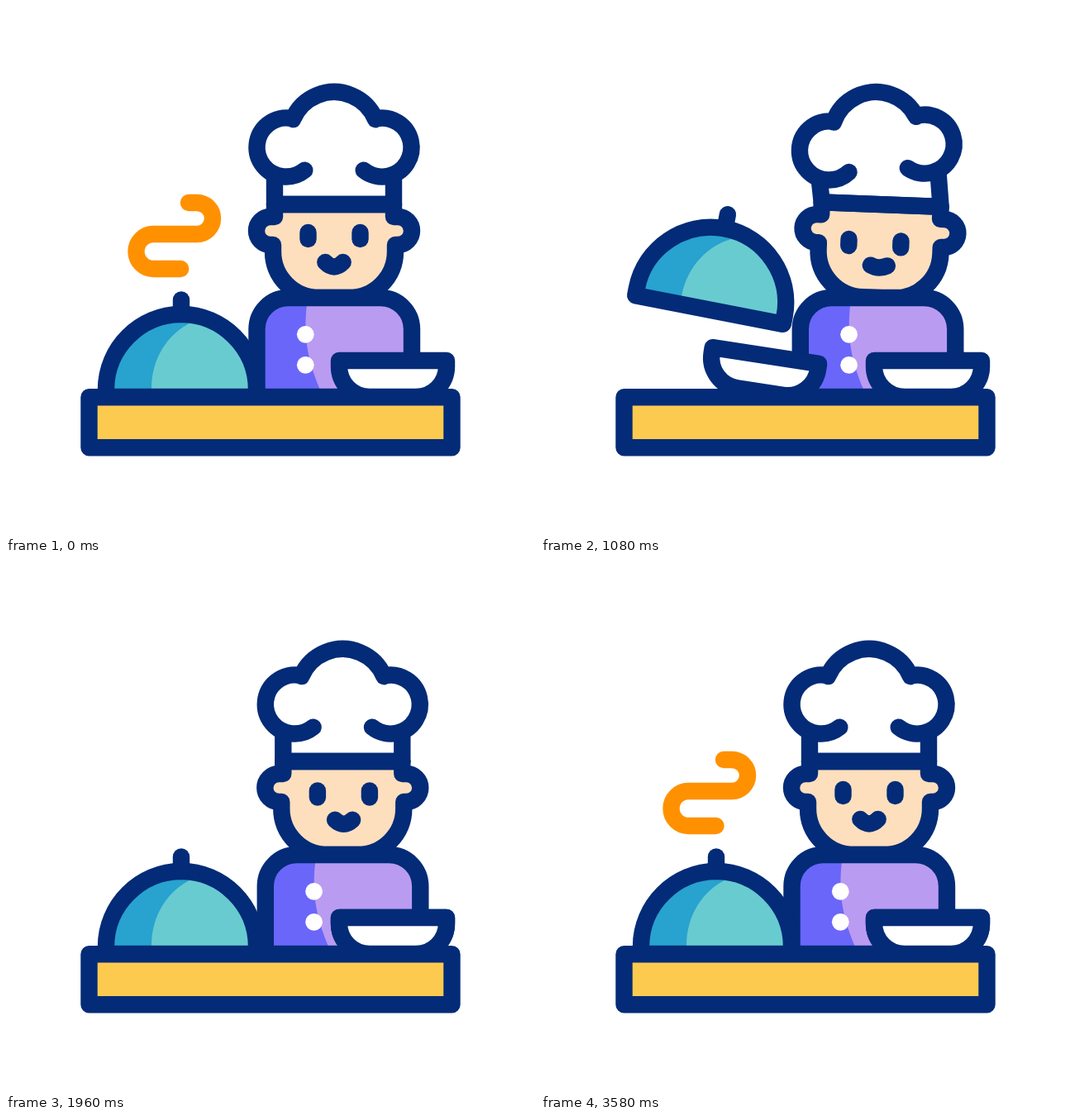
These frames come from a looping animation (640x640 px, 3600 ms). An HTML page with a canvas:

```html
<!DOCTYPE html>
<html lang="en">
<head>
<meta charset="utf-8">
<title>Chef</title>
<style>
  html, body { margin: 0; width: 100%; height: 100%; overflow: hidden; background: #fff; }
  canvas { display: block; width: 640px; height: 640px; }
</style>
</head>
<body>
<canvas id="stage" width="640" height="640"></canvas>
<script>
const ctx = document.getElementById('stage').getContext('2d');
const LOOP = 3600;
const NAVY = '#032b77', YELLOW = '#fdca50', ORANGE = '#ff9100', SKIN = '#fddfbd';
const VIOLET = '#6a66fa', LILAC = '#ba9bf2', BLUE = '#28a2ce', TEAL = '#68cbd0';

const rad = deg => deg * Math.PI / 180;
const ramp = (t, a, b) => Math.min(1, Math.max(0, (t - a) / (b - a)));

// Eased 0 to 1.
function rise(t, a, b) {
  const u = ramp(t, a, b);
  return u * u * (3 - 2 * u);
}

// Eased 0 to 1 and back to 0.
const bump = (t, a, peak, b) => rise(t, a, peak) - rise(t, peak, b);

function motion(t) {
  const aside = rise(t, 300, 1100) - rise(t, 1960, 2640);
  const sway = bump(t, 1080, 1520, 1960);
  const look = rise(t, 150, 480) - rise(t, 1600, 2100);
  const glance = bump(t, 1080, 1520, 2100);
  const lift = bump(t, 500, 1080, 1750);
  const settle = bump(t, 1380, 1520, 1660);
  const body = 10.3 * aside + 19.3 * sway;
  return {
    body,
    head: 5.4 * bump(t, 740, 1520, 1960),
    puff: body - bump(t, 640, 1080, 1520) + 13.8 * sway,
    puffTilt: 1.3 * sway - 3.9 * bump(t, 640, 1080, 1520),
    eyeX: 15.4 * glance - 6 * look,
    eyeY: 9.4 * look - 2 * glance,
    mouthX: 9 * glance,
    mouth: look,
    stretch: 19 * bump(t, 300, 540, 760),
    lidX: -8.5 * lift,
    lidY: -105.5 * lift,
    lidTilt: 11 * lift,
    bowlX: 256 * (rise(t, 880, 1520) - 1) + 3.5 * settle,
    bowlY: 6 * (rise(t, 1520, 1660) - rise(t, 880, 1080)),
    bowlTilt: 8.7 * bump(t, 880, 1080, 1400) - 2 * settle
  };
}

const HEAD = new Path2D(`M325 240 V255 H320 a17 17 0 0 0 0 34 H323 V297
  a56 56 0 0 0 56 56 H415 a56 56 0 0 0 56 -56 V289 H474 a17 17 0 0 0 0 -34 H469 V240 Z`);
const COAT = new Path2D('M303.5 473 V391 a38 38 0 0 1 38 -38 H453 a38 38 0 0 1 38 38 V473 Z');
const COAT_SHADE = new Path2D('M303 353 H365 C359 395 363 428 384 473 H303 Z');
const BOWL = new Path2D('M403 429 H533 V436 a37 37 0 0 1 -37 37 H440 a37 37 0 0 1 -37 -37 Z');
const COUNTER = new Path2D('M100.5 473.3 H539.5 V534.3 H100.5 Z');
const STEAM = new Path2D('M211.5 318 H178.5 a21 21 0 0 1 0 -42 H231 a19 19 0 0 0 0 -38 H221');
const STEAM_LENGTH = 95.5 + 40 * Math.PI;

const PUFF = new Path2D();
PUFF.arc(339, 171, 35.5, rad(51), rad(283));
PUFF.arc(397, 158.4, 54.4, rad(203), rad(337));
PUFF.arc(455, 171, 35.5, rad(257), rad(129));

function paint(path, fill) {
  if (fill) {
    ctx.fillStyle = fill;
    ctx.fill(path);
  }
  ctx.stroke(path);
}

// Fill a shape in two colours, then outline it.
function paintSplit(path, base, part, color) {
  ctx.fillStyle = base;
  ctx.fill(path);
  ctx.save();
  ctx.clip(path);
  ctx.fillStyle = color;
  ctx.fill(part);
  ctx.restore();
  ctx.stroke(path);
}

function line(...points) {
  ctx.beginPath();
  points.forEach(([x, y]) => ctx.lineTo(x, y));
  ctx.stroke();
}

// Shift by (dx, dy) and turn about (px, py).
function pose(dx, dy, deg, px, py, draw) {
  ctx.save();
  ctx.translate(px + dx, py + dy);
  ctx.rotate(rad(deg));
  ctx.translate(-px, -py);
  draw();
  ctx.restore();
}

function place([x, y], dx, deg, px, py) {
  const c = Math.cos(rad(deg)), s = Math.sin(rad(deg));
  return [px + dx + (x - px) * c - (y - py) * s, py + (x - px) * s + (y - py) * c];
}

function drawFace(m) {
  paint(HEAD, SKIN);
  line([325, 240], [469, 240]);
  for (const x of [365.5, 428.5]) {
    line([x + m.eyeX, 274 + m.eyeY], [x + m.eyeX, 282 + m.eyeY]);
  }
  const x = 397 + m.mouthX, half = 10.7 - 0.7 * m.mouth, y = 310 + 4 * m.mouth;
  ctx.beginPath();
  ctx.moveTo(x - half, y);
  ctx.quadraticCurveTo(x, 321 - 2 * m.mouth, x + half, y);
  ctx.stroke();
}

function drawChef(m) {
  for (const x of [325, 469]) {
    line(place([x, 206], m.puff, m.puffTilt, 397, 171),
      place([x, 240], m.body, m.head, 397, 355));
  }
  pose(m.puff, 0, m.puffTilt, 397, 171, () => paint(PUFF));
  pose(m.body, 0, m.head, 397, 355, () => drawFace(m));
  pose(m.body, 0, 0, 0, 0, () => {
    paintSplit(COAT, LILAC, COAT_SHADE, VIOLET);
    ctx.fillStyle = '#fff';
    for (const y of [397.3, 434.3]) {
      ctx.beginPath();
      ctx.arc(362.3, y, 10.4, 0, 7);
      ctx.fill();
    }
  });
}

function drawLid(m) {
  const s = m.stretch, top = 373 - s, knob = 212 - s / 10;
  const lid = new Path2D(`M121 473 V464 C121 ${414 - s / 4} 162 ${top} 212 ${top}
    S303 ${414 - s / 4} 303 464 V473 Z`);
  const shine = new Path2D(`M176 473 V463 C176 ${427 - s / 2} 195 ${396 - s} 226 ${382 - s}
    L240 ${360 - s} H320 V473 Z`);
  pose(m.lidX, m.lidY, m.lidTilt, 212, 473, () => {
    paintSplit(lid, BLUE, shine, TEAL);
    line([knob, top], [knob, top - 17.5]);
  });
}

// The trail is eaten from its lower end, later drawn again from there.
function drawSteam(t) {
  const again = t > LOOP / 2;
  const start = again ? 0 : ramp(t, 0, 700);
  const end = again ? ramp(t, 2960, 3580) : 1;
  if (end <= start) return;
  ctx.save();
  ctx.strokeStyle = ORANGE;
  ctx.setLineDash([(end - start) * STEAM_LENGTH, 1000]);
  ctx.lineDashOffset = -start * STEAM_LENGTH;
  ctx.stroke(STEAM);
  ctx.restore();
}

function render(t) {
  const m = motion(t);
  ctx.fillStyle = '#fff';
  ctx.fillRect(0, 0, 640, 640);
  ctx.strokeStyle = NAVY;
  ctx.lineWidth = 20.4;
  ctx.lineCap = ctx.lineJoin = 'round';
  drawSteam(t);
  drawChef(m);
  paint(BOWL, '#fff');
  pose(m.bowlX, m.bowlY, m.bowlTilt, 468, 429, () => paint(BOWL, '#fff'));
  drawLid(m);
  paint(COUNTER, YELLOW);
}

const begin = performance.now();
function tick() {
  render((performance.now() - begin) % LOOP);
  requestAnimationFrame(tick);
}
tick();
</script>
</body>
</html>
```
